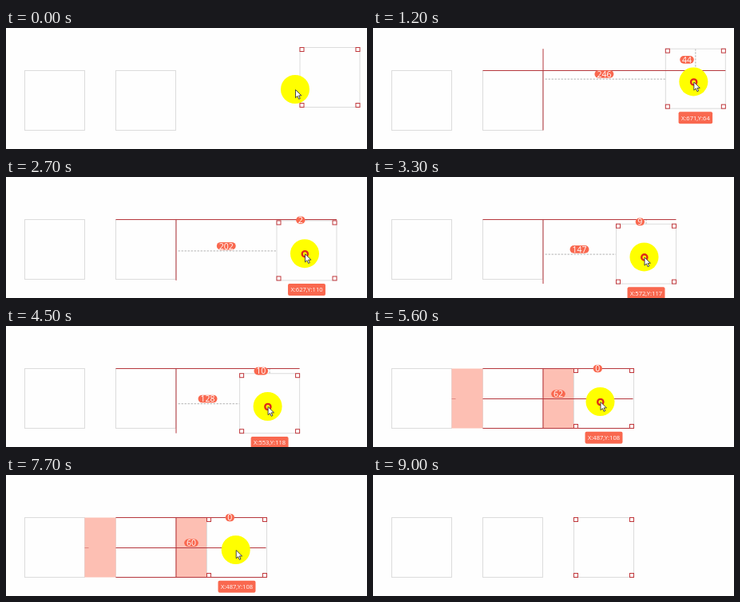
These frames come from a looping animation (452 px wide and 152 px high, 9600 ms). An HTML page:

```html
<!DOCTYPE html>
<html lang="en">
<head>
<meta charset="utf-8">
<title>Snapping guides</title>
<style>
  html, body { margin: 0; width: 100%; height: 100%; overflow: hidden; background: #fefefe; }
  svg { display: block; width: 100vw; height: 100vh; }
  text { font-family: "Open Sans", "Noto Sans", sans-serif; fill: #fff; text-anchor: middle; }
  .box { fill: none; stroke: #dcdcdc; }
  .handle { fill: #fff; stroke: #c0383c; }
  .guide { fill: none; stroke: #b5373d; }
  .tag { fill: #f9684f; }
  .gap { fill: #fdbfb3; }
  .dash { fill: none; stroke: #b4b4b4; stroke-dasharray: 2.5 1.5; }
</style>
</head>
<body>
<svg id="stage" viewBox="0 0 452 152"></svg>
<script>
const LOOP = 9600, STEP = 100;
const SIZE = 75, TOP = 53.5, BOTTOM = TOP + SIZE, MID = TOP + SIZE / 2;
const LEFT_X = 23.5, MIDDLE_X = 137.5, SNAP_X = 251.5;
const EDGE = MIDDLE_X + SIZE;
const SCALE = 1.604; // document units per stage pixel
const PRESS = 600, SNAP = 5600, RELEASE = 7700;

// Each key: time, x, y
const boxKeys = [
  [600, 368, 24.5], [1500, 365.5, 27], [2000, 352.5, 44.2], [2400, 350.5, 53.5],
  [2500, 350.5, 53.5], [3300, 304.5, 59.1], [3500, 302.5, 59.3],
  [4500, 292.6, 59.7], [5500, 254, 53.9], [5600, SNAP_X, TOP]
];
const enterKeys = [[0, 362, 77], [300, 403, 65.8]];
const leaveKeys = [
  [5600, 284.5, 95], [6300, 284.5, 95], [7000, 287.7, 94],
  [8700, 287.7, 94], [8900, 356, 136]
];

const stage = document.getElementById("stage");

function add(tag, attrs, parent = stage) {
  const el = document.createElementNS("http://www.w3.org/2000/svg", tag);
  set(el, attrs);
  return parent.appendChild(el);
}
function set(el, attrs) {
  for (const k in attrs) el.setAttribute(k, attrs[k]);
}
function show(el, on) {
  el.setAttribute("visibility", on ? "visible" : "hidden");
}
function move(el, x, y) {
  el.setAttribute("transform", `translate(${x} ${y})`);
}
function at(keys, t) {
  if (t <= keys[0][0]) return keys[0].slice(1);
  for (let i = 1; i < keys.length; i++) {
    const a = keys[i - 1], b = keys[i];
    if (t <= b[0]) {
      const k = (t - a[0]) / (b[0] - a[0]);
      return [a[1] + (b[1] - a[1]) * k, a[2] + (b[2] - a[2]) * k];
    }
  }
  return keys[keys.length - 1].slice(1);
}
function square(x, y, parent) {
  return add("rect", { class: "box", x, y, width: SIZE, height: SIZE }, parent);
}

function makeTag(height, radius, size, baseline) {
  const g = add("g", {});
  const rect = add("rect", { class: "tag", y: -height / 2, height, rx: radius }, g);
  const text = add("text", { y: baseline, "font-size": size }, g);
  return { g, rect, text };
}
function setTag(tag, label, width, x, y) {
  set(tag.rect, { x: -width / 2, width });
  tag.text.textContent = label;
  move(tag.g, x, y);
}
const pillWidth = label => 5 + 6.3 * String(label).length;

square(LEFT_X, TOP);
square(MIDDLE_X, TOP);

const gaps = add("g", {});
for (const x of [LEFT_X + SIZE, EDGE]) {
  add("rect", { class: "gap", x, y: TOP, width: SNAP_X - EDGE, height: SIZE }, gaps);
}
add("path", { class: "guide", d: `M${LEFT_X + SIZE} ${MID + 0.5}h5`, opacity: 0.4 }, gaps);

const dashes = add("path", { class: "dash" });
const box = add("g", {});
square(0, 0, box);
const guides = add("path", { class: "guide" });

const handles = add("g", {});
for (const x of [0, SIZE - 5]) {
  for (const y of [0, SIZE - 5]) {
    add("rect", { class: "handle", x, y, width: 5, height: 5 }, handles);
  }
}

const gapTag = makeTag(9.6, 4.8, 10.5, 3.8);
const topTag = makeTag(9.6, 4.8, 10.5, 3.8);
const posTag = makeTag(15, 2, 7.6, 2.8);

const cursor = add("g", {});
add("circle", { r: 18, fill: "#ffff00" }, cursor);
const ring = add("circle", { cx: 0.3, cy: 0.5, r: 3.6, fill: "none", stroke: "#df2a18", "stroke-width": 2.4 }, cursor);
add("path", {
  d: "M.5 .5v10.2l2.4-2.2 1.7 3.8 1.7-.8-1.7-3.6h3.3z",
  fill: "#fff", stroke: "#333", "stroke-width": 0.9
}, cursor);

function draw(now) {
  const t = Math.floor((now % LOOP) / STEP) * STEP;
  const [x, y] = at(boxKeys, t);
  const dragging = t >= PRESS && t <= RELEASE;
  const snapped = t >= SNAP;

  move(box, x, y);
  move(handles, x, y);

  const right = x + SIZE, cx = x + SIZE / 2, cy = y + SIZE / 2;
  const lineX = t >= 1700 && t < 2400 ? LEFT_X : MIDDLE_X;
  let lines = `M${lineX} ${TOP}H${right}`
    + `M${EDGE + 0.5} ${Math.min(y, TOP)}V${Math.max(y, TOP) + SIZE}`;
  if (snapped) lines += `M${MIDDLE_X} ${BOTTOM}H${right}M${MIDDLE_X} ${MID + 0.5}H${right - 1}`;
  guides.setAttribute("d", lines);
  dashes.setAttribute("d", `M${EDGE + 3} ${cy + 0.5}H${x}M${cx} ${y}V${TOP}`);

  const docX = Math.round(487 + (x - SNAP_X) * SCALE);
  const docY = Math.round(108 + (y - TOP) * SCALE);
  const gap = t >= 6400 ? 60 : docX - 425;
  const rise = Math.abs(docY - 108);
  const topWidth = pillWidth(rise);
  const nudge = t >= 6400 ? 1 : 0;
  setTag(gapTag, gap, pillWidth(gap), (EDGE + x) / 2, cy - 5.7);
  setTag(topTag, rise, topWidth, cx - 2 - topWidth / 2 - nudge, (y + TOP) / 2);
  const label = `X:${docX},Y:${docY}`;
  setTag(posTag, label, label.length * 4.45 - 2, cx, y + SIZE + 11.7);

  for (const el of [guides, gapTag.g, topTag.g, posTag.g]) show(el, dragging);
  show(dashes, dragging && !snapped);
  show(gaps, dragging && snapped);

  const [px, py] = t < PRESS ? at(enterKeys, t)
    : t < SNAP ? [x + 35, y + 41.3]
    : at(leaveKeys, t);
  move(cursor, px, py);
  show(cursor, t < 9000);
  show(ring, t >= PRESS && t < RELEASE);
}

const start = performance.now();
function tick() {
  draw(performance.now() - start);
  requestAnimationFrame(tick);
}
tick();
</script>
</body>
</html>
```
